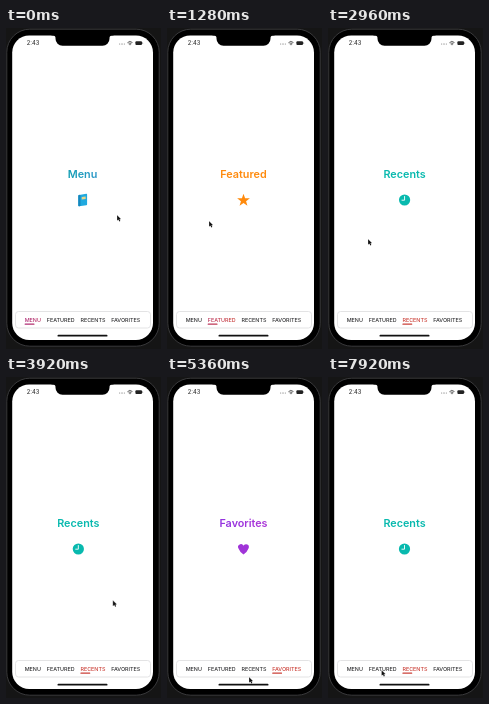
An HTML page with a canvas that plays this animation: 155 px wide and 321 px high, repeating every 8000 ms.

```html
<!DOCTYPE html>
<html lang="en">
<head>
<meta charset="utf-8">
<title>Paged tabs</title>
<style>
html, body { margin: 0; width: 100%; height: 100%; overflow: hidden; background: #151515; }
canvas { display: block; width: 155px; height: 321px; }
</style>
</head>
<body>
<canvas id="stage"></canvas>
<script>
const W = 155, H = 321, LOOP = 8000;
const PAGE = 141, CX = 76.5, ICON_Y = 172;
const TAB_SIZE = 5.4, TAB_GAP = 5.8;
const FONT = 'Inter, "Liberation Sans", sans-serif';

const canvas = document.getElementById('stage');
const ctx = canvas.getContext('2d');
const dpr = window.devicePixelRatio || 1;
canvas.width = W * dpr;
canvas.height = H * dpr;

const pages = [
  { title: 'Menu', from: '#159fb4', to: '#2e98c9', icon: book },
  { title: 'Featured', from: '#ff8a0c', to: '#ff8a0c', icon: star },
  { title: 'Recents', from: '#08b9ae', to: '#08b9ae', icon: clock },
  { title: 'Favorites', from: '#9433df', to: '#a936d8', icon: heart }
];

// Three equal swipes, then a tap on the third tab
const swipes = [0, 1, 2].map(k => ({
  start: 260 + 1800 * k,
  end: 680 + 1800 * k,
  y: 187 + 18 * k,
  x0: 111,
  x1: 42 - 2 * k
}));
const TAP = 6500, SLIDE = 285, SETTLE = 70, FADE = 250;

const picks = swipes.map((s, k) => ({ at: s.end + 80, from: k, to: k + 1 }));
picks.push({ at: TAP, from: 3, to: 2 });

// Cursor glides; it rests at each goal until the next glide begins
const glides = swipes.flatMap(s => [
  { t0: s.start - 700, t1: s.start - 160, x: s.x0, y: s.y },
  { t0: s.start, t1: s.end, x: s.x1, y: s.y + 6 }
]);
glides.push(
  { t0: 4580, t1: 5300, x: 82, y: 300 },
  { t0: 5480, t1: 6100, x: 88, y: 294 },
  { t0: 6960, t1: 7600, x: 53.5, y: 293 }
);

const clamp = v => Math.min(1, Math.max(0, v));
const ease = p => p * p * (3 - 2 * p);
const ramp = (t, t0, t1) => ease(clamp((t - t0) / (t1 - t0)));

function pointer(t) {
  let { x, y } = glides[0];
  for (const g of glides) {
    const k = ramp(t, g.t0, g.t1);
    x += (g.x - x) * k;
    y += (g.y - y) * k;
  }
  return { x, y };
}

function scroll(t) {
  let pos = 0;
  for (const s of swipes) {
    if (t < s.start) break;
    const drag = (s.x0 - pointer(Math.min(t, s.end)).x) / PAGE;
    pos += t < s.end ? drag : 1 - (1 - drag) * Math.exp((s.end - t) / SETTLE);
  }
  const left = 1 - clamp((t - TAP) / SLIDE);
  return pos - (1 - left * left);
}

function selection(t) {
  let active = 0;
  const level = [1, 0, 0, 0];
  for (const p of picks) {
    if (t < p.at) break;
    active = p.to;
    level[p.to] = ramp(t, p.at, p.at + FADE);
    level[p.from] = 1 - level[p.to];
  }
  return { active, level };
}

function box(x, y, w, h, r, fill) {
  ctx.beginPath();
  ctx.roundRect(x, y, w, h, r);
  paint(fill);
}

function disc(x, y, r, fill) {
  ctx.beginPath();
  ctx.arc(x, y, r, 0, Math.PI * 2);
  paint(fill);
}

function paint(fill) {
  ctx.fillStyle = fill;
  ctx.fill();
}

function outline(color, width) {
  ctx.strokeStyle = color;
  ctx.lineWidth = width;
  ctx.stroke();
}

function blend(x0, x1, from, to) {
  const g = ctx.createLinearGradient(x0, 0, x1, 0);
  g.addColorStop(0, from);
  g.addColorStop(1, to);
  return g;
}

function setFont(size, weight, align = 'left') {
  ctx.font = `${weight} ${size}px ${FONT}`;
  ctx.textAlign = align;
}

function label(str, x, y, fill) {
  ctx.fillStyle = fill;
  ctx.fillText(str, x, y);
}

function book() {
  ctx.transform(1, -0.14, 0, 1, 0, 0);
  box(-4.2, -5.6, 8.8, 11.4, 0.8, '#20a9df');
  box(-4.2, -5.6, 2.2, 11.4, 0.8, '#1687bd');
  box(-0.8, -3, 4, 2.4, 0.2, '#e5d58a');
}

function star(fill) {
  ctx.beginPath();
  for (let i = 0; i < 10; i++) {
    const a = i * Math.PI / 5, r = i % 2 ? 2.7 : 6.7;
    ctx.lineTo(r * Math.sin(a), 0.4 - r * Math.cos(a));
  }
  paint(fill);
}

function clock(fill) {
  disc(0, 0, 5.6, fill);
  ctx.beginPath();
  ctx.moveTo(0, -3.9);
  ctx.lineTo(0, 0.2);
  ctx.lineTo(-3, 0.2);
  outline('#fff', 0.9);
}

function heart() {
  ctx.beginPath();
  ctx.arc(-2.6, -2, 2.8, Math.PI * 0.8, 0);
  ctx.arc(2.6, -2, 2.8, Math.PI, Math.PI * 0.2);
  ctx.quadraticCurveTo(3.6, 3, 0, 5.6);
  ctx.quadraticCurveTo(-3.6, 3, -4.87, -0.35);
  paint('#a034d8');
}

function drawPages(pos) {
  setFont(10.8, 600, 'center');
  pages.forEach((p, i) => {
    const x = CX + (i - pos) * PAGE;
    if (Math.abs(x - CX) >= PAGE) return;
    label(p.title, x, 149.6, blend(x - 15, x + 15, p.from, p.to));
    ctx.save();
    ctx.translate(x, ICON_Y);
    p.icon(p.from);
    ctx.restore();
  });
}

function drawStatus() {
  setFont(5.7, 500);
  label('2:43', 20.8, 17.2, '#333');
  for (let i = 0; i < 4; i++) disc(113.6 + i * 1.6, 16, 0.45, '#444');
  for (const r of [1.9, 3.4]) {
    ctx.beginPath();
    ctx.arc(124, 17, r, -Math.PI * 0.77, -Math.PI * 0.23);
    outline('#333', 0.8);
  }
  disc(124, 16.6, 0.7, '#333');
  box(129.4, 13.2, 6.6, 3.8, 1, '#222');
  box(136.4, 14.4, 0.7, 1.4, 0.3, '#555');
}

function drawTabs({ active, level }) {
  box(9.5, 283.5, 135, 16.5, 3, '#fff');
  outline('#dcdcde', 0.8);
  setFont(TAB_SIZE, 500);
  const names = pages.map(p => p.title.toUpperCase());
  const widths = names.map(n => ctx.measureText(n).width);
  const total = widths.reduce((sum, w) => sum + w + TAB_GAP, -TAB_GAP);
  const tint = blend(15, 70, '#ad2b7c', '#cb4038');
  let x = CX - total / 2;
  names.forEach((name, i) => {
    label(name, x, 293.9, i === active ? tint : '#333335');
    ctx.globalAlpha = level[i];
    box(x, 295.6, 9.8 * level[i], 1.1, 0.3, tint);
    ctx.globalAlpha = 1;
    x += widths[i] + TAB_GAP;
  });
}

function drawBody() {
  ctx.fillStyle = '#151515';
  ctx.fillRect(0, 0, W, H);
  box(0.8, 1.2, 152.4, 317, 23, '#000');
  outline('#39393b', 1);
}

function drawNotch() {
  const l = CX - 27, r = CX + 27, top = 7.4, low = 17.8;
  ctx.beginPath();
  ctx.moveTo(l - 4, top);
  ctx.arcTo(l, top, l, low, 2.5);
  ctx.arcTo(l, low, r, low, 7);
  ctx.arcTo(r, low, r, top, 7);
  ctx.arcTo(r, top, r + 4, top, 2.5);
  ctx.lineTo(r + 4, top);
  ctx.lineTo(r + 4, 6);
  ctx.lineTo(l - 4, 6);
  paint('#000');
}

function drawCursor({ x, y }) {
  ctx.save();
  ctx.translate(x, y);
  ctx.beginPath();
  ctx.moveTo(1.4, 3);
  ctx.lineTo(2.8, 6.2);
  outline('#111', 1.1);
  ctx.beginPath();
  ctx.moveTo(0, 0);
  ctx.lineTo(0, 5.6);
  ctx.lineTo(4, 4);
  ctx.closePath();
  paint('#111');
  outline('rgba(255,255,255,0.6)', 0.4);
  ctx.restore();
}

function draw(t) {
  ctx.setTransform(dpr, 0, 0, dpr, 0, 0);
  drawBody();
  ctx.save();
  box(6.2, 7.4, 140.8, 304.6, 17, '#fff');
  ctx.clip();
  drawPages(scroll(t));
  drawStatus();
  drawTabs(selection(t));
  box(CX - 25, 306.8, 50, 1.7, 0.85, '#111');
  ctx.restore();
  drawNotch();
  drawCursor(pointer(t));
}

const begin = performance.now();
function tick() {
  draw((performance.now() - begin) % LOOP);
  requestAnimationFrame(tick);
}
tick();
</script>
</body>
</html>
```
